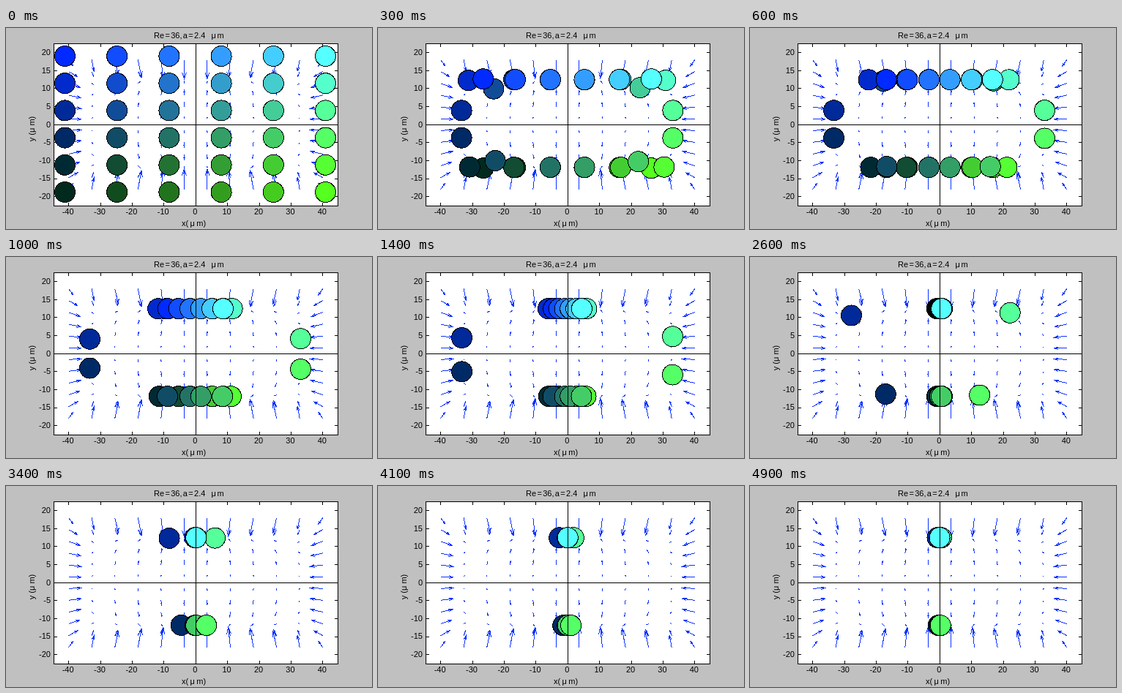
Animation of 500x275 px, one loop 5000 ms. Source, as an HTML page:

```html
<!DOCTYPE html>
<html lang="en">
<head>
<meta charset="utf-8">
<title>Particle focusing</title>
<style>
  html, body { margin: 0; width: 100%; height: 100%; overflow: hidden; background: #c0c0c0; }
  svg { display: block; width: 500px; height: 275px; }
  text { font: 11px "Liberation Sans", Arial, sans-serif; fill: #000; }
  .mid { text-anchor: middle; }
  .end { text-anchor: end; }
  .line { fill: none; stroke: #000; }
  #arrows { fill: none; stroke: #0a32ff; }
  #dots circle { stroke: #000; }
  .crisp { shape-rendering: crispEdges; }
</style>
</head>
<body>
<svg viewBox="0 0 500 275">
  <rect width="500" height="275" fill="#c0c0c0"/>
  <rect class="crisp" x="65.5" y="21.5" width="388" height="222" fill="#fff" stroke="#000"/>
  <path id="ticks" class="line crisp"/>
  <g id="labels"></g>
  <text x="202" y="14" style="word-spacing:-1.7px">Re = 36, a = 2.4</text>
  <text x="280.5" y="14" style="word-spacing:-1.5px">μ m</text>
  <text x="240" y="271" style="word-spacing:-.7px">x( μ m)</text>
  <text class="mid" transform="translate(39 138) rotate(-90)">y (μ m)</text>
  <path id="arrows" class="crisp"/>
  <g id="dots" class="crisp"></g>
  <path class="line crisp" d="M65 132.5H453M259.5 22V243"/>
</svg>
<script>
const NS = 'http://www.w3.org/2000/svg';
const { abs, exp, log, sin, sign, min, max, floor, PI } = Math;
const $ = id => document.getElementById(id);
const add = (parent, tag, attrs) => {
  const el = document.createElementNS(NS, tag);
  for (const k in attrs) el.setAttribute(k, attrs[k]);
  return parent.appendChild(el);
};
const px = x => 259.2 + 4.34 * x;
const py = y => 132.2 - 4.925 * y;
const snap = v => floor(v) + 0.5;

// ticks and their labels
let ticks = '';
for (let v = -40; v <= 40; v += 10) {
  ticks += `M${snap(px(v))} 22v4M${snap(px(v))} 243v-4`;
  add($('labels'), 'text', { x: px(v) - 1, y: 255, class: 'mid' }).textContent = v;
}
for (let v = -20; v <= 20; v += 5) {
  ticks += `M66 ${snap(py(v))}h4M453 ${snap(py(v))}h-4`;
  add($('labels'), 'text', { x: 61, y: py(v) + 3.4, class: 'end' }).textContent = v;
}
$('ticks').setAttribute('d', ticks);

// velocity in pixels: pushed off the side walls, drawn to two lines at y = ±12.5
function flow(x, y) {
  const m = abs(x) / 40, s = abs(y) / 18;
  const wall = 17 * m ** 18 * (1 - 0.65 * s ** 4);
  const drift = 5 * sin(PI * (m - 0.09) / 0.91) * s ** 1.3;
  const lines = (1 - m ** 3) * (y < 0 ? 28 : 26) * y * (y * y - 156) / 3024;
  return [-sign(x) * (wall + drift), lines + 0.46 * m ** 4 * y];
}

function arrow(x, y, u, v) {
  const head = 0.33, wide = 0.33 * head;
  const tx = x + u, ty = y + v, bx = tx - head * u, by = ty - head * v;
  const at = (a, b) => a.toFixed(2) + ' ' + b.toFixed(2);
  return `M${at(x, y)}L${at(tx, ty)}M${at(bx - wide * v, by + wide * u)}` +
    `L${at(tx, ty)}L${at(bx + wide * v, by - wide * u)}`;
}

let field = '';
for (let i = 0; i < 12; i++) {
  for (let j = 0; j < 12; j++) {
    const x = -40 + i * 80 / 11, y = 18 - j * 36 / 11;
    field += arrow(px(x), py(y), ...flow(x, y));
  }
}
$('arrows').setAttribute('d', field);

// particles gather at (MX, MY ± FOCUS)
const MX = 259, MY = 130.7, FOCUS = 60, DECAY = 1.65;
const ramp = s => log(1 + exp(8 * s)) / 8;
const sigmoid = s => 1 / (1 + exp(-s));

// moment when a particle starts for the middle: late near the walls and the centre line
function release(row, col) {
  const h = abs(2 * col - 5) / 5, q = min(row, 5 - row);
  const lead = 0.18 * (col > 2) + 0.36 * (row > 2);
  return -0.1 + h ** 3.2 * (0.21 + 0.24 * q ** 3.35) - (h * q / 2) ** 4 * lead;
}

function place(p, t) {
  const dx = p.x - MX, dy = p.y - MY;
  const far = abs(dx) - p.push * (1 - exp(-15 * t));
  const d = far * exp(-DECAY * (ramp(t - p.start) - ramp(-p.start)));

  const rate = 3.4 + 12 * exp(-3 * p.start);
  const left = s => sigmoid(-rate * (s - p.start + 0.33));
  const y = FOCUS + (abs(dy) - FOCUS) * left(t) / left(0);
  return [MX + sign(dx) * d, MY + sign(dy) * y];
}

function colour(row, col) {
  const g = min(255, 42 + 32 * col + 2.2 * col * col);
  return `rgb(${17 * col},${g},${max(30, 255 - 51 * row)})`;
}

const dots = [];
for (let row = 5; row >= 0; row--) {
  for (let col = 0; col < 6; col++) {
    dots.push({
      x: 80.5 + 71.2 * col,
      y: 38.5 + 37.2 * row,
      push: col % 5 ? 0 : 26 + 4 * min(row, 5 - row),
      start: release(row, col),
      el: add($('dots'), 'circle', { r: 14, fill: colour(row, col) })
    });
  }
}

function draw() {
  const t = floor(performance.now() / 100) % 50 / 10;
  for (const p of dots) {
    const [x, y] = place(p, t);
    p.el.setAttribute('cx', x.toFixed(2));
    p.el.setAttribute('cy', y.toFixed(2));
  }
  requestAnimationFrame(draw);
}
draw();
</script>
</body>
</html>
```
